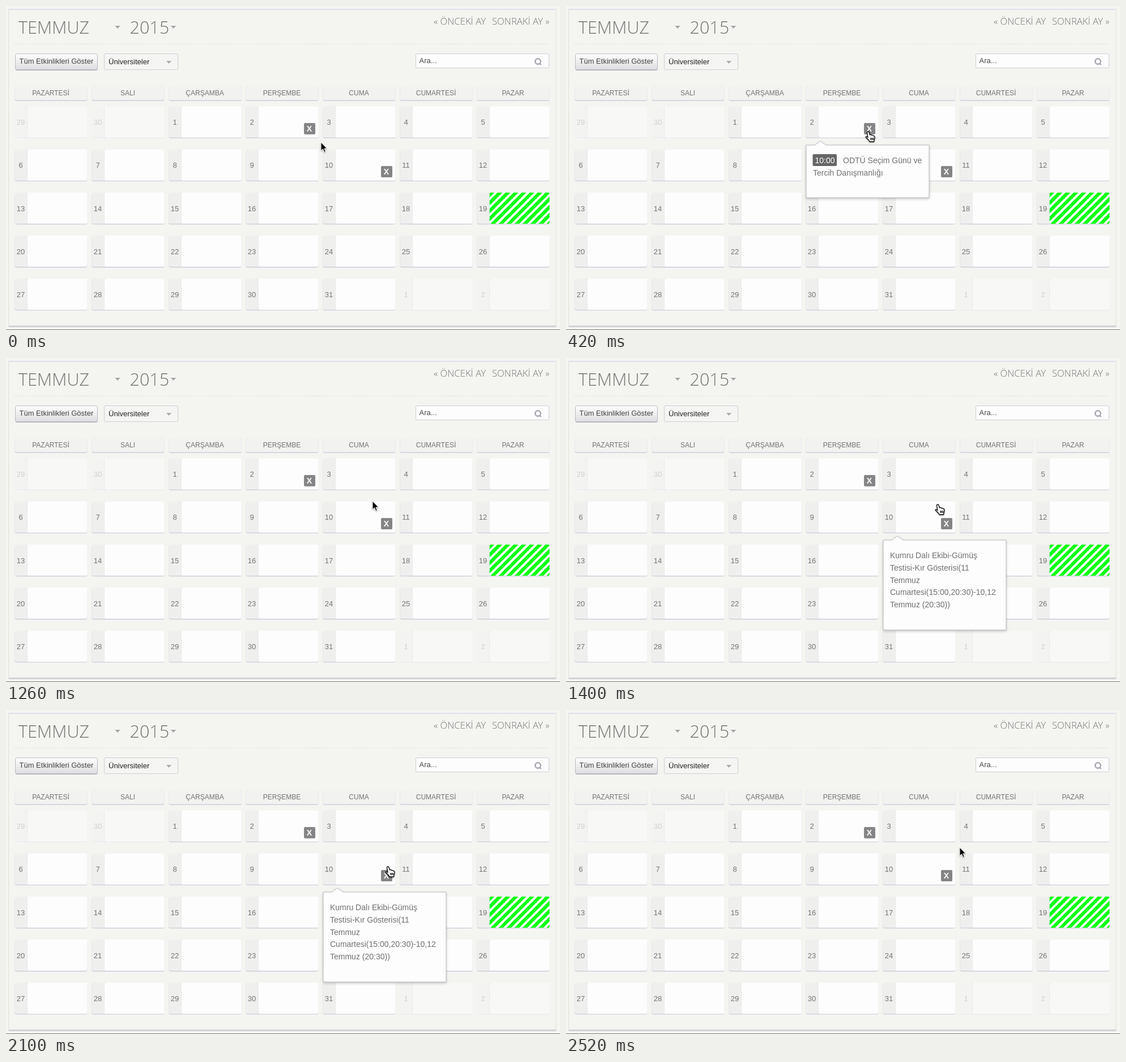
Animation of 978 by 573 pixels, one loop 2.59 s. Source, as an HTML page:

```html
<!DOCTYPE html>
<html lang="tr">
<head>
<meta charset="utf-8">
<style>
  html, body { margin: 0; height: 100%; overflow: hidden; background: #f5f5f1; }
  svg { display: block; font: 13px Arial, "Liberation Sans", sans-serif; fill: #747474; }
  .light { font-family: "Open Sans", sans-serif; font-weight: 300; }
  .mid { text-anchor: middle; }
  .tip { font-size: 14px; fill: #707070; }
  .tip path { fill: #fdfdfd; stroke: #b9b9bd; filter: drop-shadow(0 2px 2px #0003); }
  #cursor { filter: drop-shadow(0 1px 1px #0005); }
</style>
</head>
<body>
<svg id="stage" width="978" height="573" viewBox="0 0 978 573">
  <defs>
    <linearGradient id="shine" x2="0" y2="1">
      <stop stop-color="#fdfdfd"/><stop offset="1" stop-color="#dedee2"/>
    </linearGradient>
    <linearGradient id="stripes" gradientUnits="userSpaceOnUse" spreadMethod="repeat"
      x1="854" y1="330" x2="861.07" y2="337.07">
      <stop offset=".54" stop-color="#08ff14"/><stop offset=".6" stop-color="#fdfffd"/>
      <stop offset=".95" stop-color="#fdfffd"/><stop offset="1" stop-color="#08ff14"/>
    </linearGradient>
  </defs>
</svg>
<script>
const LOOP = 2590, STEP = 70;
const stage = document.getElementById('stage');
const days = ['PAZARTESİ', 'SALI', 'ÇARŞAMBA', 'PERŞEMBE', 'CUMA', 'CUMARTESİ', 'PAZAR'];
const colX = c => 15.5 + 136 * c;
const rowY = r => 178 + 76.2 * r;

const rect = (x, y, w, h, fill, extra = '') =>
  `<rect x="${x}" y="${y}" width="${w}" height="${h}" fill="${fill}" ${extra}/>`;
const text = (x, y, str, extra = '') => `<text x="${x}" y="${y}" ${extra}>${str}</text>`;
const caret = (x, y, fill) => `<path fill="${fill}" d="M${x} ${y}h9l-4.5 5z"/>`;

function chrome() {
  return rect(4.5, 5.5, 966.5, 561, '#f4f4f1', 'stroke="#e0e0da"')
    + rect(5, 5, 966, 1.5, '#dadaec')
    + rect(5, 565, 966, 3, '#d2d2d6') + rect(0, 572, 978, 1, '#777')
    + text(22, 49, 'TEMMUZ', 'class="light" font-size="30.5"') + caret(192.5, 35, '#a2a2a6')
    + text(218.5, 49, '2015', 'class="light" font-size="30.5"') + caret(291, 35, '#a2a2a6')
    + text(755, 33, '« ÖNCEKİ AY', 'class="light" font-size="16.7"')
    + text(858, 33, 'SONRAKİ AY »', 'class="light" font-size="16.7"')
    + '<path d="M16 67.5H959" stroke="#dddde0" stroke-dasharray="3 2"/>'
    + rect(16.5, 85.5, 145, 28.5, '#adadb5', 'rx="3"')
    + rect(16.5, 84.5, 145, 28, 'url(#shine)', 'rx="3" stroke="#bdbdc2"')
    + text(23.5, 102, 'Tüm Etkinlikleri Göster', 'fill="#444"')
    + rect(173.5, 84.5, 130, 28, '#f5f5f3', 'rx="2" stroke="#cfcfd3"')
    + text(181, 103, 'Üniversiteler', 'fill="#222"') + caret(283, 97, '#aaa')
    + rect(723.5, 84.5, 235, 25, '#fdfdfd', 'rx="2" stroke="#cfcfd6"')
    + text(729.5, 101, 'Ara...', 'fill="#444"')
    + '<path d="M942 102l3 2" stroke="#a0a0ae" stroke-width="2"/>'
    + '<circle cx="939" cy="98" r="4.8" fill="none" stroke="#a0a0ae" stroke-width="2.2"/>';
}

function dayCell(i) {
  const x = colX(i % 7), y = rowY(Math.floor(i / 7));
  const day = i < 2 ? 29 + i : (i - 2) % 31 + 1;
  const muted = i < 2 || i > 32;
  const face = muted ? '#f8f8f7' : i === 20 ? 'url(#stripes)' : '#fdfdfd';
  return rect(x, y + 1, 128, 54.8, muted ? '#ebebf0' : '#cdcddb', 'rx="3"')
    + rect(x, y - .5, 128, 55, muted ? '#f3f3f2' : '#efefee', 'rx="3"')
    + rect(x + 22, y - .5, 106, 55, face, 'rx="2"')
    + `<path d="M${x + 22} ${y}v54" stroke="#e0e0e2" stroke-dasharray="2 2"/>`
    + text(x + 10.5, y + 32.2, day, `class="mid" ${muted ? 'fill="#d0d0d0"' : ''}`);
}

function badge(c, r) {
  const x = colX(c) + 102.5, y = Math.round(rowY(r) + 28.7);
  return rect(x, y, 20, 20, '#858585', 'rx="2"')
    + text(x + 9.5, y + 14.5, 'X', 'class="mid" fill="#fff" font-weight="bold" font-size="14"');
}

function tip(id, x, y, h, body) {
  return `<g class="tip" id="${id}"><path d="M${x} ${y}h15l10-7 10 7h182v${h}h-217z"
    stroke-linejoin="round"/>${body}</g>`;
}

const lines = ['Kumru Dalı Ekibi-Gümüş', 'Testisi-Kır Gösterisi(11', 'Temmuz',
  'Cumartesi(15:00,20:30)-10,12', 'Temmuz (20:30))'];

stage.innerHTML += chrome()
  + days.map((name, c) => rect(colX(c), 141, 128, 27, '#cfcfdc', 'rx="3"')
    + rect(colX(c), 140, 128, 26.5, '#f2f2f1', 'rx="3"')
    + text(colX(c) + 63.5, 158, name, 'class="mid" font-size="12"')).join('')
  + Array.from({ length: 35 }, (_, i) => dayCell(i)).join('')
  + badge(3, 0) + badge(4, 1)
  + tip('fair', 424, 246, 93, rect(435.5, 262, 42.5, 21, '#666', 'rx="2"')
    + text(439.5, 277.5, '10:00', 'fill="#fff"')
    + text(489, 277.5, 'ODTÜ Seçim Günü ve') + text(436, 299.5, 'Tercih Danışmanlığı'))
  + tip('play', 560, 322, 159, lines.map((s, i) => text(572, 354 + 21.8 * i, s)).join(''))
  + `<g id="cursor">
    <path id="arrow" fill="#000" stroke="#fff" d="M0 0V15L3.5 11.8 6 17.5 8.3 16.5 6 11H10.5Z"/>
    <path id="hand" fill="#fff" stroke="#000" stroke-width="1.3" stroke-linejoin="round"
      transform="translate(-1)"
      d="M-1.5 1.5C-1.5-.5 1.5-.5 2 1.5L3.5 6C5 5 6.5 5.5 6.8 6.8 8 6 9.3 6.5 9.6 7.8
      11 7.2 12 8 12 10 12 13 11 14.5 10.5 18H3C2 15-1.5 12.5-3.5 10.5-4.5 9-2.5 8 0 10.5Z
      M5 11v4M7.3 11v4M9.5 11v4"/></g>`;

// Pointer path: time, x, y
const path = [[0, 556, 241], [280, 536, 223], [420, 534, 222], [910, 547, 222], [1260, 647, 253],
  [1610, 674, 270], [2100, 675, 277], [2240, 677, 276], [2520, 695, 243], [LOOP, 695, 243]];

function pointer(t) {
  const i = path.findIndex(p => p[0] > t);
  const [t0, x0, y0] = path[i - 1], [t1, x1, y1] = path[i];
  const u = (t - t0) / (t1 - t0), k = u * u * (3 - 2 * u);
  return [x0 + (x1 - x0) * k, y0 + (y1 - y0) * k];
}

const over = (x, y, c, r) =>
  x > colX(c) && x < colX(c) + 128 && y > rowY(r) && y < rowY(r) + 55;
const show = (id, on) => document.getElementById(id).style.display = on ? '' : 'none';

function draw() {
  const t = Math.floor(performance.now() % LOOP / STEP) * STEP;
  const [x, y] = pointer(t).map(Math.round);
  const fair = over(x, y, 3, 0), play = over(x, y, 4, 1);
  show('fair', fair);
  show('play', play);
  show('hand', fair || play);
  show('arrow', !fair && !play);
  document.getElementById('cursor').setAttribute('transform', `translate(${x} ${y})`);
  requestAnimationFrame(draw);
}
draw();
</script>
</body>
</html>
```
